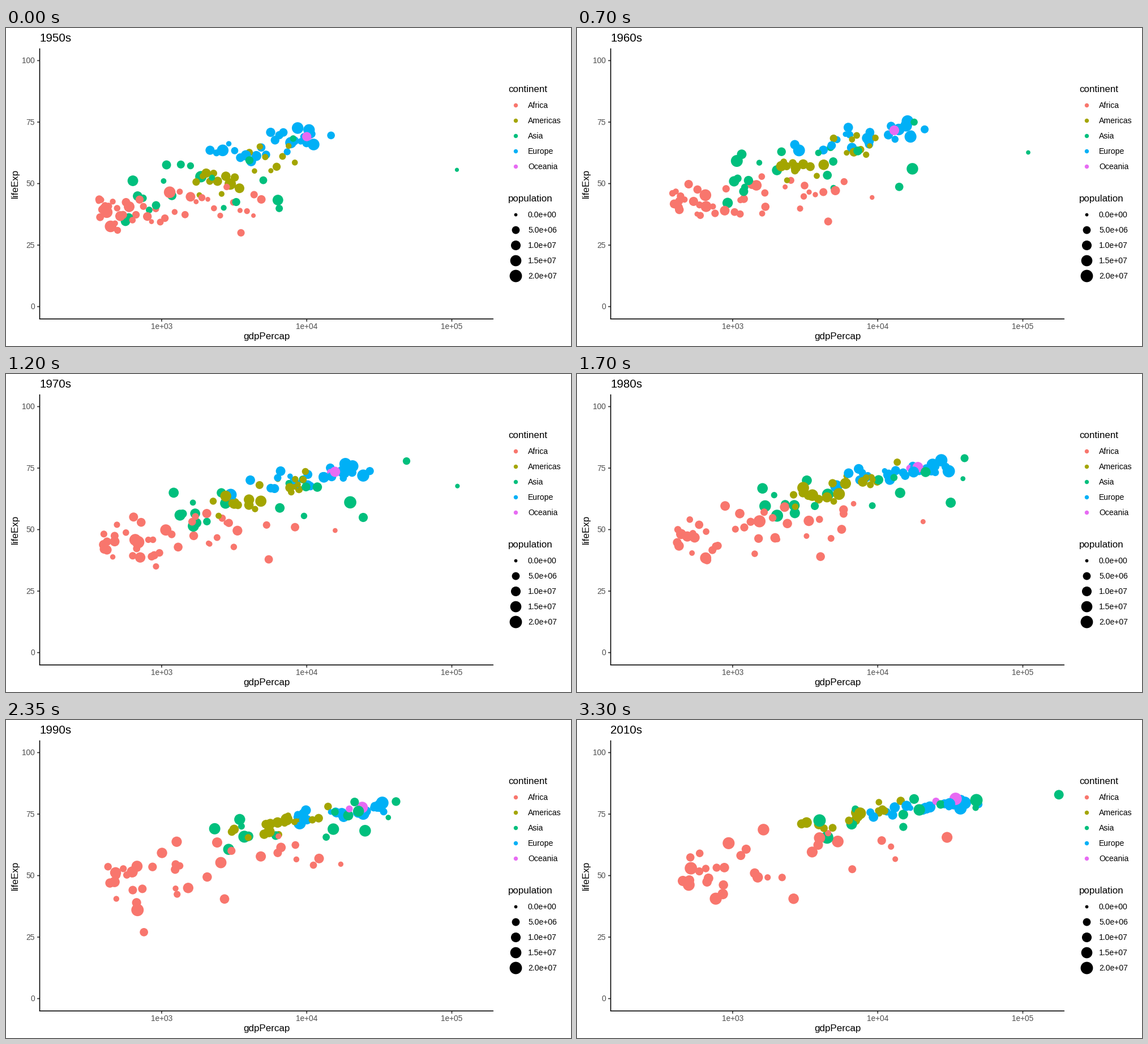
Write a matplotlib script that moves like this. It is 998 px wide and 561 px high and loops after 3350 ms.

```python
import numpy as np
import matplotlib.pyplot as plt
from matplotlib.animation import FuncAnimation

W, H, DPI = 998, 561, 64
PT = 72 / DPI
FRAMES = 67
START, END, STEP = 1952, 2007, 5
YEARS = np.arange(START, END + 1, STEP)
U = (YEARS - START) / (END - START)
POP_LIMIT = 21.0  # millions; larger dots leave the chart

plt.rcParams["font.family"] = "Liberation Sans"
rng = np.random.default_rng(12)

COLORS = {
    "Africa": "#F8766D",
    "Americas": "#A3A500",
    "Asia": "#00BF7D",
    "Europe": "#00B0F6",
    "Oceania": "#E76BF3",
}

# Dots, median population, its log spread, yearly growth, skew, and the first
# and last shape: mean log gdp, its spread, mean life, slope, spread of life
CLOUDS = {
    "Africa": (42, 3.0, .9, .022, .25, (2.97, .33, 40, 8, 4), (3.12, .38, 54, 14, 6)),
    "Americas": (22, 3.2, .7, .022, .1, (3.54, .2, 55, 24, 4), (3.83, .23, 74, 14, 2)),
    "Asia": (19, 4.5, .9, .024, .2, (3.2, .34, 48, 12, 7), (4.03, .38, 75, 9, 3)),
    "Europe": (25, 5.5, .6, .005, -.15, (3.75, .21, 66, 14, 3), (4.34, .24, 78, 8, 1.2)),
}

# Dots that leave the crowd: population, growth, then (year, gdp, life) turns
STRAYS = [
    ("Asia", .16, .05, (1952, 108400, 55.6), (1972, 109300, 67.7),
     (1982, 31400, 71.3), (2007, 47300, 77.6)),
    ("Asia", 4, .037, (1952, 6460, 39.9), (1977, 34200, 58.7), (1992, 24800, 68.8)),
    ("Asia", 8, .017, (1952, 1080, 57.6), (1972, 1210, 65), (2007, 3970, 72.4)),
    ("Africa", .4, .023, (1952, 4290, 37), (1977, 21700, 52.8), (2007, 13200, 56.7)),
    ("Africa", 4.2, .02, (1952, 3520, 30), (1972, 5470, 37.9), (1992, 2630, 40.6)),
    ("Africa", 2.5, .023, (1952, 493, 40), (1987, 848, 44), (1992, 737, 23.6),
     (2007, 863, 46.2)),
    ("Europe", 4.8, .008, (1952, 14700, 69.6), (1972, 27200, 73.8), (2007, 37500, 81)),
    ("Oceania", 8.7, .0155, (1952, 10000, 69.1), (2007, 34400, 81.2)),
    ("Oceania", 2, .013, (1952, 10600, 69.4), (2007, 25200, 80.2)),
]


def px_x(log_gdp):
    return 275 + 256.25 * (log_gdp - 3)


def px_y(life):
    return 491.5 - 4.34 * life


def radius(pop):
    return 2.9 + 8 * np.sqrt(pop / 20)


def area(r):
    return (2 * r * PT) ** 2


def grown(pop, rate):
    return pop * np.exp(rate * (YEARS - START))


def ease_out(u):
    return 1 - (1 - u) ** 1.4


def soft_cap(life):
    """Level off below the best life expectancy of the time."""
    gap = 75 + 8 * U - life
    return life + gap - 2 * np.log1p(np.exp(gap / 2))


def drift(n, keep=.97):
    """Evenly spread offsets that wander slowly from one survey to the next."""
    z = [rng.permutation(np.linspace(-1.7, 1.7, n))]
    for _ in YEARS[1:]:
        z.append(keep * z[-1] + np.sqrt(1 - keep ** 2) * rng.uniform(-1.7, 1.7, n))
    return np.array(z).T


def stray_dots():
    for name, pop, rate, *turns in STRAYS:
        t, gdp, life = np.array(turns).T
        yield (np.interp(YEARS, t, np.log10(gdp)), np.interp(YEARS, t, life),
               grown(pop, rate), COLORS[name])


def cloud_dots():
    for name, (n, median, spread, rate, skew, first, last) in CLOUDS.items():
        mx, sx, my, slope, sy = (a + (b - a) * ease_out(U) for a, b in zip(first, last))
        for zx, zy in zip(drift(n), drift(n)):
            off = sx * (zx + skew * (zx ** 2 - 1))
            # the richest of a skewed crowd are small
            start = median * np.exp(spread * rng.normal() - skew * zx[-1])
            yield (mx + off, soft_cap(my + slope * off + sy * zy),
                   grown(np.clip(start, .08, 17), rate * rng.uniform(.8, 1.2)),
                   COLORS[name])


def build():
    dots = [*stray_dots(), *cloud_dots()]
    rng.shuffle(dots)
    x, y, pop, cols = zip(*dots)
    return px_x(np.array(x).T), px_y(np.array(y).T), np.array(pop).T, np.array(cols)


X, Y, POP, COLS = build()
R = radius(POP)

fig = plt.figure(figsize=(W / DPI, H / DPI), dpi=DPI, facecolor="white")
ax = fig.add_axes([0, 0, 1, 1])
ax.set(xlim=(0, W), ylim=(H, 0))
ax.axis("off")


def label(x, y, s, size, color="black", **kw):
    return ax.text(x, y, s, fontsize=size * PT, color=color, va="baseline", **kw)


def line(x, y, color="black"):
    ax.plot(x, y, color=color, lw=1.6 * PT, solid_capstyle="butt", snap=False, zorder=1)


def key(y, text, color, r):
    ax.scatter(900.5, y, s=area(r), c=color, linewidths=0)
    label(922, y + 4.9, text, 14)


GREY, TICK = "#4D4D4D", "#333333"
for v in range(0, 101, 25):
    y = px_y(v)
    line([55, 59], [y, y], TICK)
    label(51, y + 4.9, str(v), 13.8, GREY, ha="right")
for e in (3, 4, 5):
    x = px_x(e)
    line([x, x], [514, 518], TICK)
    label(x, 531, f"1e+0{e}", 13.8, GREY, ha="center")
line([59.5, 59.5], [36, 514])
line([59, 861], [513.3, 513.3])

label(460, 549, "gdpPercap", 17, ha="center")
label(20.5, 274.5, "lifeExp", 17, ha="center", rotation=90, rotation_mode="anchor")
label(887, 112.5, "continent", 17)
label(887, 305.5, "population", 17)
for i, (name, color) in enumerate(COLORS.items()):
    key(136 + 27 * i, name, color, 3.7)
for i in range(5):
    key(329 + 27 * i, f"{5e6 * i:.1e}", "black", radius(5 * i))

title = label(59.5, 23.5, "", 20.5)
scatter = ax.scatter([], [], linewidths=0, zorder=3)


def mix(a, k, f):
    return a[k] if f == 0 else a[k] * (1 - f) + a[k + 1] * f


def draw(i):
    year = START + i * (END - START) / (FRAMES - 1)
    k, step = divmod(i, 6)  # six frames between surveys
    f = step / 6
    seen = POP[k] <= POP_LIMIT
    if step:
        seen = seen & (POP[k + 1] <= POP_LIMIT)
    scatter.set_offsets(np.column_stack([mix(X, k, f), mix(Y, k, f)])[seen])
    scatter.set_sizes(area(mix(R, k, f)[seen]))
    scatter.set_facecolor(COLS[seen])
    title.set_text(f"{int((year + 5) // 10 * 10)}s")
    return scatter, title


anim = FuncAnimation(fig, draw, frames=FRAMES, interval=50, repeat=True,
                     repeat_delay=0, init_func=lambda: draw(0))
plt.show()
```
